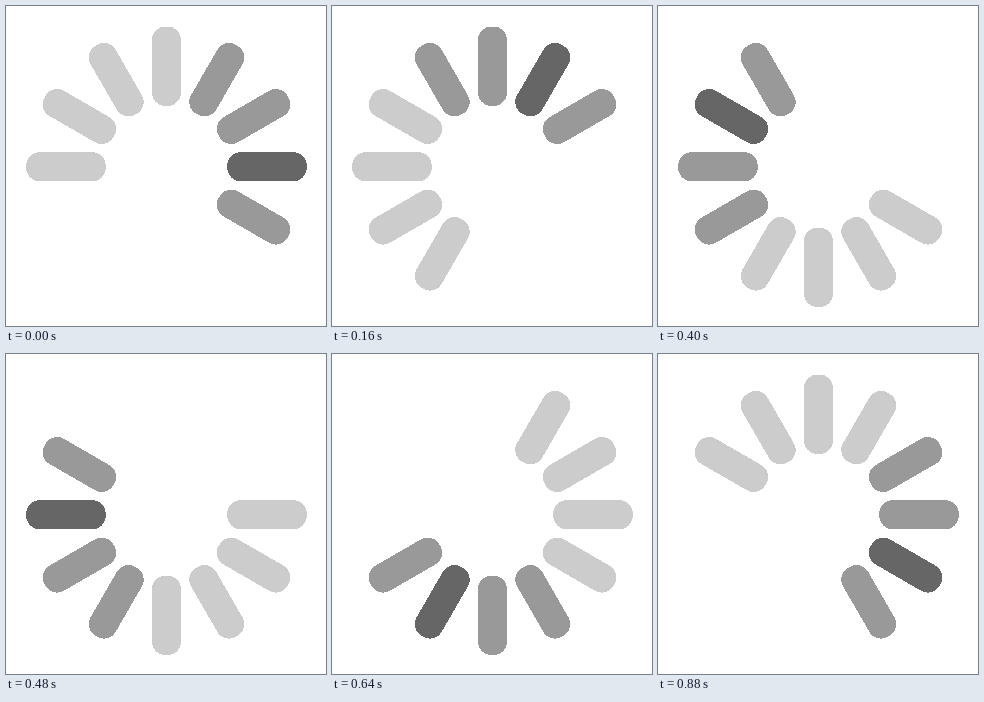
An HTML page for the animation above (0.96 s loop, 320x320 px).

```html
<!DOCTYPE html>
<html lang="en">
<head>
<meta charset="utf-8">
<title>Spinner</title>
<style>
  html, body { margin: 0; height: 100%; overflow: hidden; background: #fff; }
  svg { display: block; width: 100vw; height: 100vh; }
</style>
</head>
<body>
<svg viewBox="0 0 320 320" shape-rendering="crispEdges"></svg>
<script>
  const COUNT = 12, STEP_MS = 80;
  const DARK = '#666', MID = '#999', LIGHT = '#ccc';
  // Colours counted anticlockwise from the bar just behind the head
  const shades = [MID, DARK, MID, MID, LIGHT, LIGHT, LIGHT, LIGHT];
  const svg = document.querySelector('svg');

  const bars = Array.from({ length: COUNT }, (_, i) => {
    const bar = document.createElementNS('http://www.w3.org/2000/svg', 'rect');
    const attrs = {
      x: 60.8, y: -14.5, width: 79.45, height: 29, rx: 13.5,
      transform: `translate(160.5 160.8) rotate(${-i * 360 / COUNT})`
    };
    for (const name in attrs) bar.setAttribute(name, attrs[name]);
    return svg.appendChild(bar);
  });

  function draw(now) {
    const head = Math.floor(now / STEP_MS) % COUNT;
    bars.forEach((bar, i) => {
      const offset = (i - head + 1 + COUNT) % COUNT;
      bar.setAttribute('fill', shades[offset] || 'none');
    });
  }

  const start = performance.now();
  function tick() {
    draw(performance.now() - start);
    requestAnimationFrame(tick);
  }
  tick();
</script>
</body>
</html>
```
